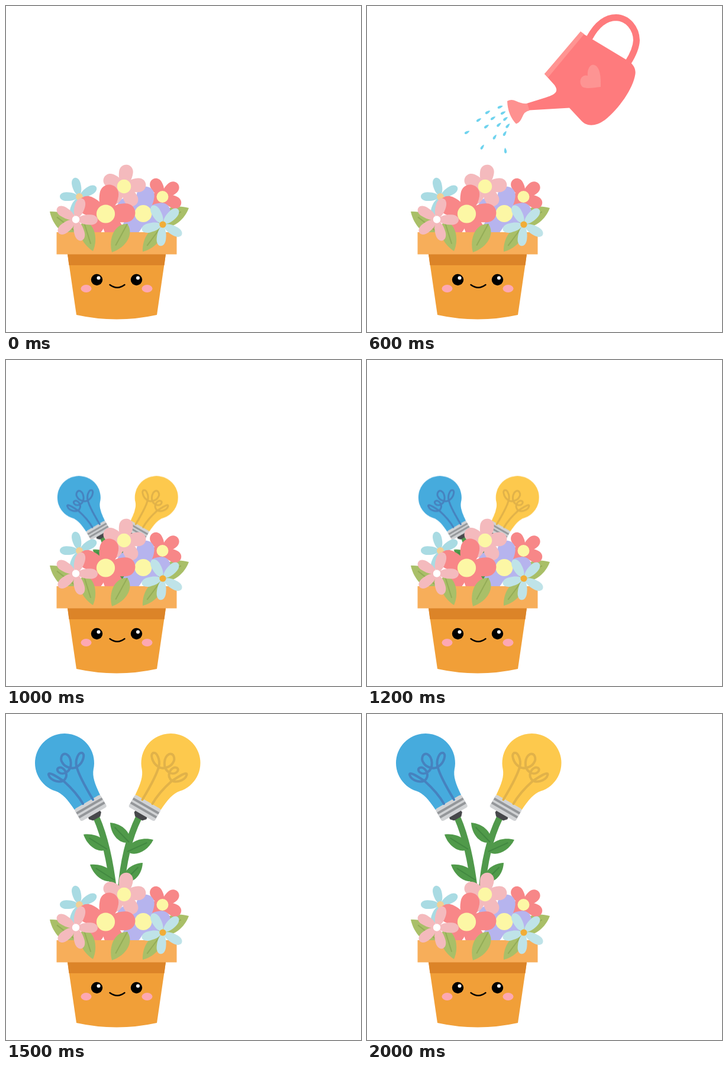
These frames come from a looping animation (600 px wide and 552 px high, 2100 ms). An HTML page:

```html
<!DOCTYPE html>
<html lang="en">
<head>
<meta charset="utf-8">
<title>Growing ideas</title>
<style>
  html, body { margin: 0; width: 100%; height: 100%; overflow: hidden; background: #fff; }
  svg { display: block; width: 100%; height: 100%; }
  #can { animation: pour 2.1s step-end infinite; }
  #plant { animation: grow 2.1s step-end infinite; }
  @keyframes pour {
    0% { opacity: 0; }
    14.2857% { opacity: 1; }
    38.0952%, 100% { opacity: 0; }
  }
  /* each stage scales about the axis x = 189 */
  @keyframes grow {
    0% { opacity: 0; transform: translate(79.4px, 242.9px) scale(.58); }
    38.0952% { opacity: 1; transform: translate(79.4px, 242.9px) scale(.58); }
    47.619% { opacity: 1; transform: translate(51px, 172.2px) scale(.73); }
    61.9048% { opacity: 1; transform: translate(29.9px, 81.6px) scale(.842, .805); }
    71.4286%, 100% { opacity: 1; transform: none; }
  }
</style>
</head>
<body>
<svg viewBox="0 0 600 552" xmlns="http://www.w3.org/2000/svg">
  <defs>
    <g id="bulb">
      <path d="M-11 98H11L12 103L7 108.5H-7L-12 103Z" fill="#47484b"/>
      <path d="M-37 33.6A50 50 0 1 1 37 33.6C29 43 26.5 56 25 77H-25C-26.5 56-29 43-37 33.6Z"/>
      <rect x="-25.5" y="76" width="51" height="24" rx="4" fill="#d1d3d5"/>
      <path d="M-25 84H25M-25 91.8H25" stroke="#94979a" stroke-width="4"/>
    </g>
    <path id="wire" fill="none" stroke-width="4" stroke-linecap="round" stroke-linejoin="round"
      d="M130 152C121 136 108 123 98 114C86 106 71 96 72 103C75 113 93 119 100 110C106 101 97 88 89 91C82 95 93 106 103 98C113 91 111 73 102 68C94 65 91 76 95 82C100 91 114 95 122 88C130 82 134 69 129 66C122 64 117 78 119 88C123 105 138 130 147 145"/>
  </defs>

  <g id="can">
    <path d="M376 54C388 32 402 19.5 421 19.5C441 20 455 38 455.5 58C455 72 448 85 441 96" fill="none" stroke="#fe7b7d" stroke-width="11"/>
    <path d="M362 45L440 92Q455 101 453.5 115C450 140 425 175 402 193C385 205 371 204 362 194L342 172.500L274 176.500L270 165L302 155C322 149 323 143 317 134L300 115Z" fill="#fe7b7d"/>
    <path d="M361 43L367 47.500L306 121L300 115Z" fill="#ff9492"/>
    <path d="M237 161Q244 157 252 161Q262 166 271 165L274.500 177Q266 178 262 189Q258 198 252 199.500Q238 185 237 161Z" fill="#fe9190"/>
    <path d="M395 137C385 138 372 141 364 137C358 131 360 120 367 118Q370 117 373 118C372 110 375 100 382 99.500C391 100 396 112 395 137Z" fill="#fd9493"/>
    <g id="drops" fill="#6fd3ee"></g>
  </g>

  <g id="plant">
    <g fill="none" stroke="#50994b" stroke-width="11">
      <path d="M153 176Q173 222 182 300"/>
      <path d="M224 176Q200 225 194 300"/>
    </g>
    <g id="sprigs"></g>
    <g fill="#46abdd"><use href="#bulb" transform="translate(99 83) rotate(-30)"/></g>
    <use href="#wire" stroke="#4682bf"/>
    <g transform="matrix(-1 0 0 1 377.5 0)">
      <g fill="#fdc94d"><use href="#bulb" transform="translate(99 83) rotate(-30)"/></g>
      <use href="#wire" stroke="#e1b249"/>
    </g>
  </g>

  <g id="back"></g>

  <path d="M104 420H270L255 523Q187 538 119 523Z" fill="#f19f38"/>
  <path d="M104 420H270L267.500 439H106.500Z" fill="#dc8428"/>
  <rect x="85.500" y="383" width="203" height="37.500" fill="#f7ae5a"/>
  <circle cx="153.500" cy="463.500" r="9.700"/>
  <circle cx="220.500" cy="463.500" r="9.700"/>
  <g fill="#fff">
    <circle cx="156.500" cy="460.500" r="3"/>
    <circle cx="223" cy="460.500" r="3"/>
  </g>
  <path d="M175.500 472Q188 481.500 200.500 472" fill="none" stroke="#000" stroke-width="2.400" stroke-linecap="round"/>
  <g fill="#fda8b2">
    <ellipse cx="135.500" cy="478.500" rx="9" ry="6.400"/>
    <ellipse cx="238.500" cy="478.500" rx="9" ry="6.400"/>
  </g>

  <g id="front"></g>
</svg>
<script>
  const put = (id, parts) => { document.getElementById(id).innerHTML = parts.join(''); };

  // Petal of length l and half width h, pointing along +x.
  const petal = (l, h) =>
    `M0 0C${.2 * l} ${-.75 * h} ${.36 * l} ${-h} ${.66 * l} ${-h}` +
    `C${.86 * l} ${-h} ${l} ${-.56 * h} ${l} 0` +
    `C${l} ${.56 * h} ${.86 * l} ${h} ${.66 * l} ${h}` +
    `C${.36 * l} ${h} ${.2 * l} ${.75 * h} 0 0Z`;

  // Petal angles, counted from the first petal.
  const round = [0, 77, 143, 214, 285];
  const slim = [0, 74, 148, 215, 285];

  function flower(spread, x, y, len, half, turn, color, r, core) {
    const petals = spread.map(a => `<path d="${petal(len, half)}" transform="rotate(${turn + a})"/>`);
    return `<g transform="translate(${x} ${y})" fill="${color}">${petals.join('')}` +
      `<circle r="${r}" fill="${core}"/></g>`;
  }

  // Leaf from base (x, y) to tip (tx, ty), w controls its width.
  function leaf(x, y, tx, ty, w, fill, vein) {
    const l = Math.hypot(tx - x, ty - y);
    const a = Math.atan2(ty - y, tx - x) * 180 / Math.PI;
    return `<g transform="translate(${x} ${y}) rotate(${a})">` +
      `<path d="M0 0C${.15 * l} ${-w} ${.65 * l} ${-w} ${l} 0C${.65 * l} ${w} ${.15 * l} ${w} 0 0Z" fill="${fill}"/>` +
      `<path d="M0 0H${.76 * l}" stroke="${vein}" stroke-width="2"/></g>`;
  }

  const sprig = (...p) => leaf(...p, 14, '#509a4a', '#428841');
  const foliage = (...p) => leaf(...p, '#a9bf68', '#94ad57');
  const yellow = '#fcf7a5';

  put('sprigs', [
    sprig(171, 229, 131, 204),
    sprig(183, 281, 142, 255),
    sprig(208, 217, 176, 184),
    sprig(205, 233, 249, 213),
    sprig(200, 283, 231, 252)
  ]);

  put('back', [
    foliage(124, 387, 74, 348, 19),
    foliage(254, 369, 309, 342, 20),
    flower(slim, 124, 323, 33, 7.4, -104, '#a9dbe3', 6, '#f2cf94'),
    flower(round, 264.5, 323, 34, 10.5, -118, '#f78788', 10, yellow),
    flower(round, 232, 351.5, 46, 15, -83, '#b6b4ee', 14.5, yellow),
    flower(round, 199.5, 305.5, 37, 11.8, -82, '#f4babd', 11.7, yellow),
    flower(round, 168.5, 352, 50, 16, -80, '#f88788', 15.6, yellow)
  ]);

  put('front', [
    foliage(131, 364, 147, 415, 16),
    foliage(205, 369, 179, 417, 18),
    foliage(262, 374, 231, 416, 15),
    flower(slim, 118, 361.5, 37, 8.6, -73, '#f4babd', 6.2, '#fff'),
    flower(slim, 265, 370, 36.5, 7.8, -119, '#bfe3e8', 5.6, '#f1ad38')
  ]);

  const drops = [
    [225, 171, -22], [204, 180, -30], [230, 181, -28], [189, 193, -32],
    [213, 190, -32], [234, 191, -38], [202, 204, -36], [223, 201, -42],
    [238, 203, -48], [169, 214, -28], [216, 222, -56], [233, 216, -58],
    [195, 239, -56], [234, 245, -96]
  ];
  put('drops', drops.map(([x, y, a]) =>
    `<path d="M5 0C2-2.600-4.500-3.200-4.500 0C-4.500 3 1 2.400 5 0Z" transform="translate(${x} ${y}) rotate(${a})"/>`));
</script>
</body>
</html>
```
